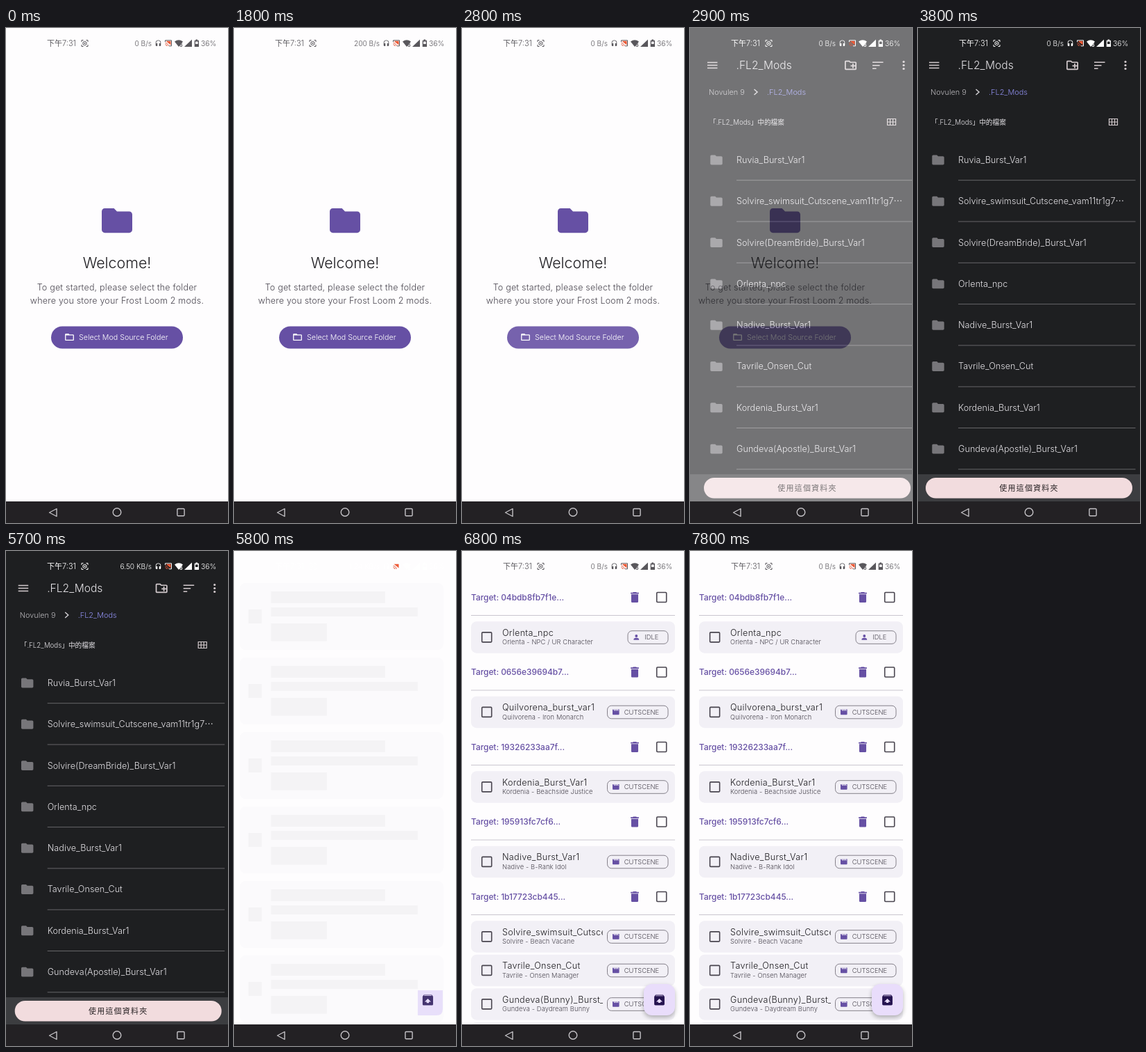
These frames come from a looping animation (320 by 711 pixels, 8 s). An HTML page:

```html
<!DOCTYPE html>
<html lang="zh-Hant">
<head>
<meta charset="utf-8">
<title>Folder setup</title>
<style>
  html, body { margin: 0; width: 100%; height: 100%; overflow: hidden; background: #fefdfe; }
  svg { display: block; width: 100%; height: 100%; }
  text { font-family: Inter, "Noto Sans CJK TC", "Noto Sans CJK JP", sans-serif; font-weight: 350; white-space: pre; }
  .medium { font-weight: 500; }
  .bold { font-weight: 700; }
</style>
</head>
<body>
<svg id="stage" viewBox="0 0 320 711" preserveAspectRatio="none"></svg>
<script>
const PURPLE = '#6650a4', INK = '#49454f', PAPER = '#fefdfe', DARK = '#1e1f21', LINK = '#8f8fee';

const PATHS = {
  folder: 'M10 4H4c-1.1 0-2 .9-2 2v12c0 1.1.9 2 2 2h16c1.1 0 2-.9 2-2V8c0-1.1-.9-2-2-2h-8z',
  folderOpen: 'M20 6h-8l-2-2H4c-1.1 0-2 .9-2 2v12c0 1.1.9 2 2 2h16c1.1 0 2-.9 2-2V8c0-1.1-.9-2-2-2zM4 18V8h16v10z',
  folderAdd: 'M20 6h-8l-2-2H4c-1.1 0-2 .9-2 2v12c0 1.1.9 2 2 2h16c1.1 0 2-.9 2-2V8c0-1.1-.9-2-2-2zM4 18V6h5.2l2 2H20v10zM15 9h2v3h3v2h-3v3h-2v-3h-3v-2h3z',
  trash: 'M6 19c0 1.1.9 2 2 2h8c1.1 0 2-.9 2-2V7H6zM19 4h-3.5l-1-1h-5l-1 1H5v2h14z',
  person: 'M12 12a4 4 0 1 0 0-8 4 4 0 0 0 0 8zm0 2c-2.7 0-8 1.3-8 4v2h16v-2c0-2.7-5.3-4-8-4z',
  movie: 'M18 4l2 4h-3l-2-4h-2l2 4h-3l-2-4H8l2 4H7L5 4H4c-1.1 0-2 .9-2 2v12c0 1.1.9 2 2 2h16c1.1 0 2-.9 2-2V4z',
  unarchive: 'M20.5 5.2l-1.4-1.7C18.9 3.2 18.5 3 18 3H6c-.5 0-.9.2-1.1.5L3.5 5.2C3.2 5.6 3 6 3 6.5V19c0 1.1.9 2 2 2h14c1.1 0 2-.9 2-2V6.5c0-.5-.2-.9-.5-1.3zM12 9.5l5.5 5.5H14v2h-4v-2H6.5zM5.1 5l.8-1h12l.9 1z',
  headphones: 'M12 2a9 9 0 0 0-9 9v8a3 3 0 0 0 3 3h3v-9H5v-2a7 7 0 0 1 14 0v2h-4v9h3a3 3 0 0 0 3-3v-8a9 9 0 0 0-9-9z',
};

const text = (x, y, size, fill, str, extra = '') =>
  `<text x="${x}" y="${y}" font-size="${size}" fill="${fill}" ${extra}>${str}</text>`;
const centered = (y, size, fill, str, extra = '') => text(160, y, size, fill, str, `text-anchor="middle" ${extra}`);
const rect = (x, y, w, h, fill, r = 0, extra = '') =>
  `<rect x="${x}" y="${y}" width="${w}" height="${h}" rx="${r}" fill="${fill}" ${extra}/>`;
const line = (d, stroke, width = 1, extra = '') =>
  `<path d="${d}" fill="none" stroke="${stroke}" stroke-width="${width}" ${extra}/>`;
const icon = (name, cx, cy, scale, fill) =>
  `<path d="${PATHS[name]}" fill="${fill}" fill-rule="evenodd" transform="translate(${cx - 12 * scale} ${cy - 12 * scale}) scale(${scale})"/>`;
const group = (id, content) => `<g id="${id}">${content}</g>`;
const repeat = (n, make) => Array.from({ length: n }, (_, i) => make(i)).join('');

function welcome() {
  return rect(-40, 0, 400, 711, PAPER)
    + icon('folder', 160, 276.6, 2.2, PURPLE)
    + centered(345, 21.4, '#1c1b1f', 'Welcome!')
    + centered(376.5, 12.5, INK, 'To get started, please select the folder', 'letter-spacing=".2"')
    + centered(396, 12.5, INK, 'where you store your Frost Loom 2 mods.', 'letter-spacing=".2"')
    + rect(65, 428.5, 190, 32, PURPLE, 16)
    + icon('folderOpen', 91.5, 444, .64, '#fff')
    + text(105, 448, 10.7, '#fff', 'Select Mod Source Folder')
    + rect(65, 428.5, 190, 32, '#fff', 16, 'id="selectPress"');
}

function picker() {
  const tint = '#d3cacd', label = '#e4e2e6';
  const files = ['Ruvia_Burst_Var1', 'Solvire_swimsuit_Cutscene_vam11tr1g7⋯', 'Solvire(DreamBride)_Burst_Var1',
    'Orlenta_npc', 'Nadive_Burst_Var1', 'Tavrile_Onsen_Cut', 'Kordenia_Burst_Var1', 'Gundeva(Apostle)_Burst_Var1'];
  const rows = files.map((name, i) => {
    const y = 189.5 + 59.3 * i;
    return icon('folder', 29, y, .87, '#77767a') + text(58, y + 4.4, 12.6, label, name, 'letter-spacing=".05"')
      + line(`M58 ${y + 29.2}H313.5`, '#666568');
  }).join('');
  return rect(-40, 0, 400, 711, DARK)
    + line('M16 49.5H30.5M16 53.5H30.5M16 57.5H30.5', tint, 1.4)
    + text(57.5, 59, 15.6, label, '.FL2_Mods')
    + icon('folderAdd', 222.5, 53.5, .85, tint)
    + line('M254 49.2H269.5M254 53.7H264.5M254 58.2H259.5', tint, 1.5)
    + [48.5, 53.5, 58.5].map(y => `<circle cx="299" cy="${y}" r="1.6" fill="${tint}"/>`).join('')
    + text(18, 96, 10.9, '#b9b7bb', 'Novulen 9')
    + line('M83.5 88L88 92L83.5 96', '#d0ced2', 1.5)
    + text(102, 96, 10.9, LINK, '.FL2_Mods')
    + text(19, 139, 9.7, label, '「.FL2_Mods」中的檔案')
    + line('M275.5 130.5H287.5V139.5H275.5ZM275.5 135H287.5M279.5 130.5V139.5M283.5 130.5V139.5', tint, 1.2)
    + rows
    + rect(-40, 641, 400, 40, '#3c3d40')
    + rect(11, 646, 298, 29.5, '#f2dcde', 14.75)
    + centered(665, 11, '#2a2426', '使用這個資料夾', 'class="medium" letter-spacing="1.2"')
    + rect(11, 646, 298, 29.5, '#000', 14.75, 'id="usePress"');
}

function dialog() {
  const body = ['如果你這麼做，「FL2 Mod Manager」從現', '在開始就能存取儲存在「.FL2_Mods」中的', '內容。'];
  return rect(28, 289, 264, 141, '#000', 3, 'opacity=".25" filter="url(#blur)"')
    + rect(28, 287, 264, 140, '#2e2f31', 2)
    + centered(315.5, 14.2, '#eceaee', '要允許「FL2 Mod Manager」存取')
    + centered(333, 14.2, '#eceaee', '「.FL2_Mods」中的檔案嗎？')
    + body.map((str, i) => text(48, 356 + 13.4 * i, 11.1, '#b9b7bb', str)).join('')
    + text(190, 410.5, 11, LINK, '取消', 'letter-spacing=".6"')
    + text(249, 410.5, 11, LINK, '允許', 'letter-spacing=".6"');
}

function skeleton() {
  const bar = '#f4f3f5';
  return rect(-40, 0, 400, 711, PAPER)
    + repeat(6, i => {
      const y = 107 * i;
      return rect(13.5, y + 46, 293.5, 96, '#fbfafc', 8) + rect(26, y + 84, 19, 20, bar)
        + rect(58.5, y + 58, 164.5, 17, bar) + rect(58.5, y + 81, 211.5, 13, bar) + rect(58.5, y + 104, 80.5, 25.5, bar);
    })
    + '<path d="M270 631H306V658Q306 667 297 667H270Z" fill="#e8dffa"/>'
    + icon('unarchive', 284.5, 645, .84, '#43336f');
}

const checkbox = (cx, cy) => rect(cx - 7, cy - 7, 14, 14, 'none', 1.2, `stroke="${INK}" stroke-width="1.6"`);

function modCard(top, name, detail, kind) {
  const y = top + 22.7, idle = kind === 'IDLE', left = idle ? 239 : 209.5;
  return rect(13, top, 294, 45.5, '#f2f0f6', 8) + checkbox(35.7, y)
    + `<g clip-path="url(#nameClip)">${text(58, y - 2.3, 12.6, '#1c1b1f', name, 'letter-spacing=".3"')}</g>`
    + text(58, y + 10.5, 9.3, INK, detail, 'letter-spacing=".15"')
    + rect(left, y - 9.2, 297 - left, 18.6, 'none', 6, 'stroke="#79747e" stroke-width=".9"')
    + icon(idle ? 'person' : 'movie', left + 12.3, y, .48, PURPLE)
    + text(left + 24.3, y + 3.4, 9.3, INK, kind);
}

function modList() {
  const groups = [
    ['04bdb8fb7f1e', ['Orlenta_npc', 'Orlenta - NPC / UR Character', 'IDLE']],
    ['0656e39694b7', ['Quilvorena_burst_var1', 'Quilvorena - Iron Monarch', 'CUTSCENE']],
    ['19326233aa7f', ['Kordenia_Burst_Var1', 'Kordenia - Beachside Justice', 'CUTSCENE']],
    ['195913fc7cf6', ['Nadive_Burst_Var1', 'Nadive - B-Rank Idol', 'CUTSCENE']],
    ['1b17723cb445', ['Solvire_swimsuit_Cutscene', 'Solvire - Beach Vacane', 'CUTSCENE'],
      ['Tavrile_Onsen_Cut', 'Tavrile - Onsen Manager', 'CUTSCENE'],
      ['Gundeva(Bunny)_Burst_Var1', 'Gundeva - Daydream Bunny', 'CUTSCENE']],
  ];
  return rect(-40, 0, 400, 711, PAPER)
    + groups.map(([hash, ...mods], i) => {
      const y = 66.5 + 107.5 * i;
      return text(13, y + 4.4, 11.9, PURPLE, `Target: ${hash}...`, 'class="medium"')
        + icon('trash', 249, y, .84, PURPLE) + checkbox(287.7, y)
        + line(`M13 ${y + 26}H307`, '#cac6cf')
        + mods.map((mod, j) => modCard(y + 34.7 + 48.5 * j, ...mod)).join('');
    }).join('')
    + rect(13, 677, 294, 45, '#f2f0f6', 8)
    + rect(262, 625, 45, 45, '#000', 12, 'opacity=".28" filter="url(#blur)"')
    + rect(262, 622, 45, 45, '#e9ddfb', 12)
    + icon('unarchive', 284.5, 645, .82, '#24124f');
}

function statusBar() {
  const c = 'currentColor';
  return text(59, 26, 11, c, '下午7:31')
    + line('M109 20V17.5H111.5M115.5 17.5H118V20M118 24V26.5H115.5M111.5 26.5H109V24', c)
    + `<circle cx="113.5" cy="22" r="2.7" fill="none" stroke="${c}"/><circle cx="113.5" cy="22" r="1" fill="${c}"/>`
    + text(210, 25.7, 10.2, c, '', 'id="speed" text-anchor="end"')
    + icon('headphones', 219.5, 21.7, .42, c)
    + line('M229.5 20V17.8H238.5V25.8H235', c)
    + '<path d="M230.5 18.8H237.5V24.5Z" fill="#ee5a36"/>'
    + line('M229.5 21.5A4.5 4.5 0 0 1 234 26M229.5 23.7A2.3 2.3 0 0 1 231.8 26', '#e0583c')
    + `<path d="M243 19.5Q249 15 255 19.5L249 27Z" fill="${c}"/>`
    + text(250, 27, 7, c, '6', 'class="bold"')
    + `<path d="M257 27L268 16.5V27Z" fill="${c}"/>`
    + `<path d="M273.5 16.5H276V17.7H278V27H271.7V17.7H273.5ZM273 19.5V23H276.7V19.5Z" fill="${c}" fill-rule="evenodd"/>`
    + text(281, 25.7, 10.4, c, '36%');
}

const stage = document.getElementById('stage');
stage.innerHTML = `<defs>
    <clipPath id="nameClip"><rect x="50" y="0" width="153" height="711"/></clipPath>
    <filter id="blur" x="-30%" y="-30%" width="160%" height="160%"><feGaussianBlur stdDeviation="3"/></filter>
  </defs>`
  + group('welcome', welcome()) + group('skeleton', skeleton()) + group('list', modList())
  + group('picker', picker())
  + rect(0, 680, 320, 31, '#232124')
  + rect(0, 0, 320, 711, '#0a0208', 0, 'id="dim"')
  + group('dialog', dialog())
  + group('status', statusBar())
  + line('M73 690.5V701.5L62.5 696Z', '#c4c2c6', 1.4, 'stroke-linejoin="round"')
  + '<circle cx="160" cy="695.5" r="5.8" fill="none" stroke="#c4c2c6" stroke-width="1.4"/>'
  + rect(246.9, 690.5, 10.2, 10.2, 'none', 1.2, 'stroke="#c4c2c6" stroke-width="1.4"');

const parts = Object.fromEntries(['welcome', 'skeleton', 'list', 'picker', 'dim', 'dialog', 'status', 'speed',
  'selectPress', 'usePress'].map(id => [id, document.getElementById(id)]));

const ramp = (t, start, length) => Math.min(1, Math.max(0, (t - start) / length));
const bezier = (u, a, b, c, d) => a * (1 - u) ** 3 + 3 * b * u * (1 - u) ** 2 + 3 * c * u * u * (1 - u) + d * u ** 3;

// Fast out, extra slow in: two joined cubic curves.
function slideEase(x) {
  const [xs, ys] = x < 1 / 6
    ? [[0, .05, .1333, 1 / 6], [0, 0, .06, .4]]
    : [[1 / 6, .2083, .25, 1], [.4, .82, 1, 1]];
  let low = 0, high = 1;
  for (let i = 0; i < 24; i++) {
    const mid = (low + high) / 2;
    if (bezier(mid, ...xs) < x) low = mid; else high = mid;
  }
  return bezier(low, ...ys);
}

const LOOP = 8000, STEP = 100, SHIFT = 32, OPEN = 2799, CLOSE = 5665, SLIDE = 450;
const SPEEDS = [[0, '0 B/s'], [900, '76 B/s'], [1800, '200 B/s'], [2800, '0 B/s'],
  [4900, '6.50 KB/s'], [5800, '1.24 KB/s'], [6800, '0 B/s']];

function show(part, opacity, transform = '') {
  part.style.display = opacity > 0 ? '' : 'none';
  part.setAttribute('opacity', opacity);
  part.setAttribute('transform', transform);
}

function draw(t) {
  const opened = slideEase(ramp(t, OPEN, SLIDE)), closed = slideEase(ramp(t, CLOSE, SLIDE));
  const returning = `translate(${-SHIFT * (1 - closed)} 0)`;
  const pickerAlpha = ramp(t, OPEN + 50, 83) * (1 - ramp(t, CLOSE + 35, 83));
  const dialogIn = ramp(t, 4500, 250), dialogAlpha = dialogIn * (1 - ramp(t, 5600, 100));
  const scale = .9 + .1 * (1 - (1 - dialogIn) ** 3);

  show(parts.welcome, t < CLOSE ? 1 : 0, `translate(${-SHIFT * opened} 0)`);
  show(parts.skeleton, t >= CLOSE ? 1 : 0, returning);
  show(parts.list, ramp(t, 5950, 150), returning);
  show(parts.picker, pickerAlpha, `translate(${SHIFT * (1 - opened + closed)} 0)`);
  show(parts.dim, .32 * dialogAlpha);
  show(parts.dialog, dialogAlpha, `translate(160 357) scale(${scale}) translate(-160 -357)`);
  show(parts.selectPress, t >= 2700 && t < 3000 ? .1 : 0);
  show(parts.usePress, t >= 4300 && t < 4600 ? .1 : 0);
  parts.status.style.color = t > 2800 && t < 5900 ? '#fff' : '#59575c';
  parts.speed.textContent = SPEEDS.findLast(([start]) => t >= start)[1];
}

const began = performance.now();
function frame() {
  const t = (performance.now() - began) % LOOP;
  draw(Math.floor(t / STEP) * STEP);
  requestAnimationFrame(frame);
}
frame();
</script>
</body>
</html>
```
